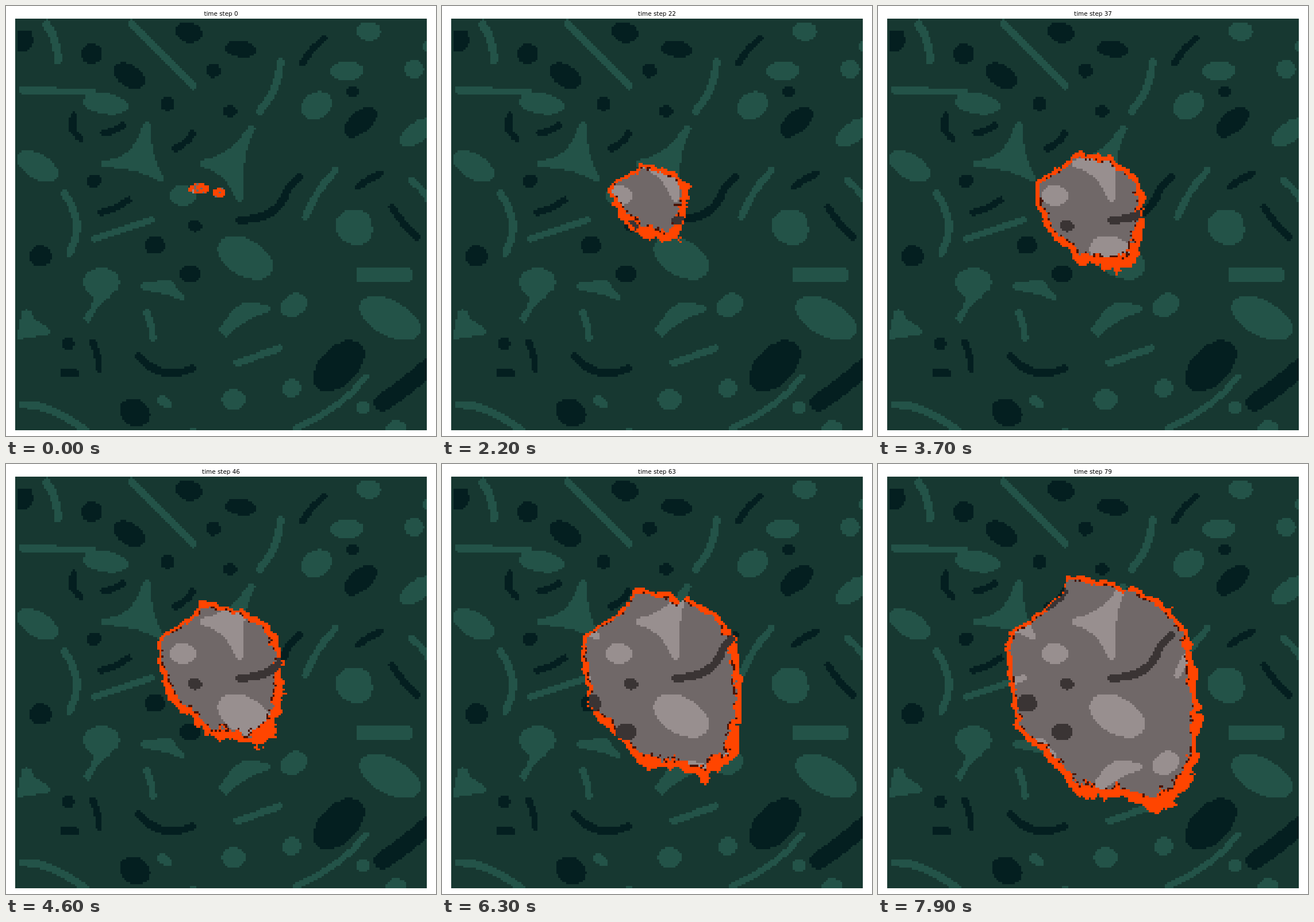
Animation, 748 px wide and 748 px high, one loop 8000 ms. Source, as an HTML page with a canvas:

```html
<!DOCTYPE html>
<html lang="en">
<head>
<meta charset="utf-8">
<title>Spreading fire</title>
<style>
  html, body { margin: 0; width: 100%; height: 100%; overflow: hidden; background: #fff; }
  canvas, svg { position: absolute; left: 0; top: 0; }
  text { font: 10.4px "DejaVu Sans", sans-serif; text-anchor: middle; }
</style>
</head>
<body>
<canvas id="stage" width="748" height="748"></canvas>
<svg width="748" height="748"><text id="title" x="374" y="17"></text></svg>
<script>
const N = 200, LEFT = 16, TOP = 22, SIZE = 716, CELL = SIZE / N;
const STEPS = 80, STEP_MS = 100;
const BURN = 6, DARK_BURN = 1.5, EMBER = 0.7;

// Vegetation: 0 plain, 1 light, 2 dark
const GREEN = [[23, 56, 49], [35, 83, 72], [4, 31, 32]];
const BURNT = [[112, 104, 104], [152, 143, 143], [58, 52, 52]];
const FIRE = [255, 69, 0], EMBERS = [74, 20, 6];

const grid = document.createElement('canvas');
grid.width = grid.height = N;
const g = grid.getContext('2d', { willReadFrequently: true });

function oval(x, y, rx, ry = rx, deg = 0) {
  g.beginPath();
  g.ellipse(x, y, rx, ry, deg * Math.PI / 180, 0, 7);
  g.fill();
}
function band(path, width = 13, cap = 'round') {
  g.lineWidth = width;
  g.lineCap = cap;
  g.stroke(new Path2D(path));
}
// Filled shape with softly rounded corners
function blob(path) {
  const shape = new Path2D(path + 'Z');
  g.lineWidth = 8;
  g.lineJoin = 'round';
  g.fill(shape);
  g.stroke(shape);
}
function ink(color) { g.fillStyle = g.strokeStyle = color; }

function drawLight() {
  ink('#f00');
  band('M66 27Q90 54 91 99', 14, 'butt');
  band('M219 30L326 139');
  band('M28 147L150 150');
  oval(173, 170, 40, 18, 8);
  oval(631, 44, 21, 17);
  oval(593, 113, 29, 17);
  oval(710, 110, 17, 16);
  oval(732, 70, 7, 8);
  band('M478 97Q473 150 441 183');
  oval(540, 173, 29, 23, -35);
  oval(715, 220, 34, 18, -35);
  oval(55, 279, 40, 22, 30);
  blob('M242 206L247 206Q246 255 271 303Q230 278 170 276L170 273Q225 272 242 206');
  blob('M426 211L430 212Q406 250 409 334L405 336Q385 285 342 276L342 273Q395 262 426 211');
  oval(307, 330, 24, 18);
  band('M573 286Q540 320 521 366', 12);
  band('M706 303Q722 316 734 335', 12);
  blob('M594 359L617 359Q634 366 634 390Q634 412 612 412Q576 410 577 376Z');
  band('M101 326Q140 380 110 430');
  band('M154 405L253 372', 12);
  oval(416, 438, 52, 32, 30);
  oval(166, 480, 32, 25);
  blob('M150 499Q166 512 139 543L143 547Q152 522 178 503');
  blob('M239 485L285 480L306 508Q280 496 240 490');
  band('M245 534Q255 555 256 578', 12);
  oval(501, 520, 25, 19, -30);
  blob('M613 460H702V476H613');
  oval(668, 543, 58, 31, 28);
  blob('M375 562Q405 516 425 518L456 525V529Q420 535 382 572');
  blob('M23 576L31 533H39L48 549L73 564L71 568');
  band('M402 621L476 595', 12);
  oval(497, 665, 16);
  oval(396, 685, 21, 18);
  oval(621, 698, 11, 12);
  oval(276, 689, 14, 9, 35);
  oval(679, 738, 19, 17);
  oval(325, 738, 5);
  band('M28 693Q75 692 139 738');
  band('M625 645Q590 695 506 734', 11);
}

function drawDark() {
  ink('#0f0');
  blob('M23 47H41L44 63L36 75L23 76');
  oval(149, 83, 19, 17);
  oval(214, 121, 30, 19, 32);
  oval(318, 46, 23, 18, 15);
  oval(408, 75, 28, 14, 6);
  oval(361, 112, 12);
  oval(281, 170, 12);
  oval(389, 183, 13, 10);
  oval(603, 149, 10, 9);
  band('M553 56Q530 74 516 99', 12);
  oval(617, 202, 34, 19, -40);
  band('M119 191Q106 212 129 230');
  band('M170 222Q190 218 203 207', 12);
  band('M325 222Q314 240 294 248', 12);
  oval(153, 304, 13, 11);
  band('M166 359Q195 352 213 337', 12);
  band('M406 373Q466 371 484 334Q492 310 511 297');
  band('M613 314Q630 300 651 291', 12);
  band('M671 350Q690 380 715 402', 12);
  oval(329, 383, 12, 10);
  oval(259, 416, 18, 16);
  oval(60, 435, 20, 18);
  oval(320, 466, 18, 15);
  oval(108, 588, 11);
  g.fillRect(95, 632, 31, 12);
  band('M151 586Q162 605 162 632', 12);
  band('M230 608Q265 654 324 631');
  oval(224, 707, 28, 23, 30);
  oval(579, 626, 54, 33, -45);
  band('M655 690Q690 668 738 626', 31);
}

g.fillRect(0, 0, N, N);
g.setTransform(1 / CELL, 0, 0, 1 / CELL, -LEFT / CELL, -TOP / CELL);
drawLight();
drawDark();
g.setTransform(1, 0, 0, 1, 0, 0);
const mask = g.getImageData(0, 0, N, N).data;
const kind = Array.from({ length: N * N }, (_, i) =>
  mask[i * 4 + 1] > 127 ? 2 : mask[i * 4] > 127 ? 1 : 0);

function noise(x, y, salt) {
  const v = Math.sin(x * 12.9898 + y * 78.233 + salt * 37.719) * 43758.5453;
  return v - Math.floor(v);
}
// Noise blended between lattice points three cells apart
function lumps(col, row) {
  const x = Math.floor(col / 3), y = Math.floor(row / 3), u = col / 3 - x, v = row / 3 - y;
  const mix = yy => noise(x, yy, 5) * (1 - u) + noise(x + 1, yy, 5) * u;
  return mix(y) * (1 - v) + mix(y + 1) * v;
}

// The front grows at a steady speed from a small ellipse to this outline.
const ORIGIN = { x: 350, y: 321, rx: 34, ry: 15 };
const outline = ('330,193 410,206 430,220 442,210 510,253 542,298 564,440 555,520 540,568 ' +
  '484,604 425,581 350,576 310,525 240,461 222,330 229,293 292,250 322,222').split(' ').map(p => {
  const [x, y] = p.split(',');
  return [x - ORIGIN.x, y - ORIGIN.y];
});

// How many times farther than (dx, dy) the outline lies in that direction
function reach(dx, dy) {
  let far = 0;
  outline.forEach(([ax, ay], i) => {
    const [bx, by] = outline[(i + 1) % outline.length];
    const ex = bx - ax, ey = by - ay, det = dx * ey - dy * ex;
    const along = (ax * dy - ay * dx) / det;
    if (along >= 0 && along <= 1) far = Math.max(far, (ax * ey - ay * ex) / det);
  });
  return far;
}

const inside = (x, y, cx, cy, rx, ry) => Math.hypot((x - cx) / rx, (y - cy) / ry) < 1;

function ignitionStep(col, row) {
  const x = LEFT + (col + 0.5) * CELL, y = TOP + (row + 0.5) * CELL;
  if (inside(x, y, 335, 318, 18, 9) || inside(x, y, 371, 325, 11, 9))
    return noise(col, row, 1) < 0.2 ? -BURN - 2 : 0;
  const dx = x - ORIGIN.x, dy = y - ORIGIN.y;
  const start = 1 / Math.hypot(dx / ORIGIN.rx, dy / ORIGIN.ry);
  const step = (STEPS - 1) * (1 - start) / (reach(dx, dy) - start);
  const rough = (lumps(col, row) - 0.5) * 6 + (noise(col, row, 2) - 0.5) * 1.6;
  return Math.max(1, step + rough);
}

const ignition = kind.map((_, i) => ignitionStep(i % N, Math.floor(i / N)));
const duration = kind.map((k, i) => k === 2 ? DARK_BURN : BURN + (noise(i, 0, 3) - 0.5) * 2);

function cellColor(i, step) {
  const age = step - ignition[i], k = kind[i];
  if (age < 0) return GREEN[k];
  if (age < duration[i]) return FIRE;
  return k !== 2 && age < duration[i] + EMBER ? EMBERS : BURNT[k];
}

const view = document.getElementById('stage').getContext('2d');
const title = document.getElementById('title');
const image = g.createImageData(N, N);

function render(step) {
  for (let i = 0; i < N * N; i++) {
    image.data.set(cellColor(i, step), i * 4);
    image.data[i * 4 + 3] = 255;
  }
  g.putImageData(image, 0, 0);
  view.imageSmoothingEnabled = false;
  view.drawImage(grid, LEFT, TOP, SIZE, SIZE);
  title.textContent = 'time step ' + step;
}

let shown = -1;
const begin = performance.now();
function tick() {
  const step = Math.floor((performance.now() - begin) / STEP_MS) % STEPS;
  if (step !== shown) render(shown = step);
  requestAnimationFrame(tick);
}
tick();
</script>
</body>
</html>
```
